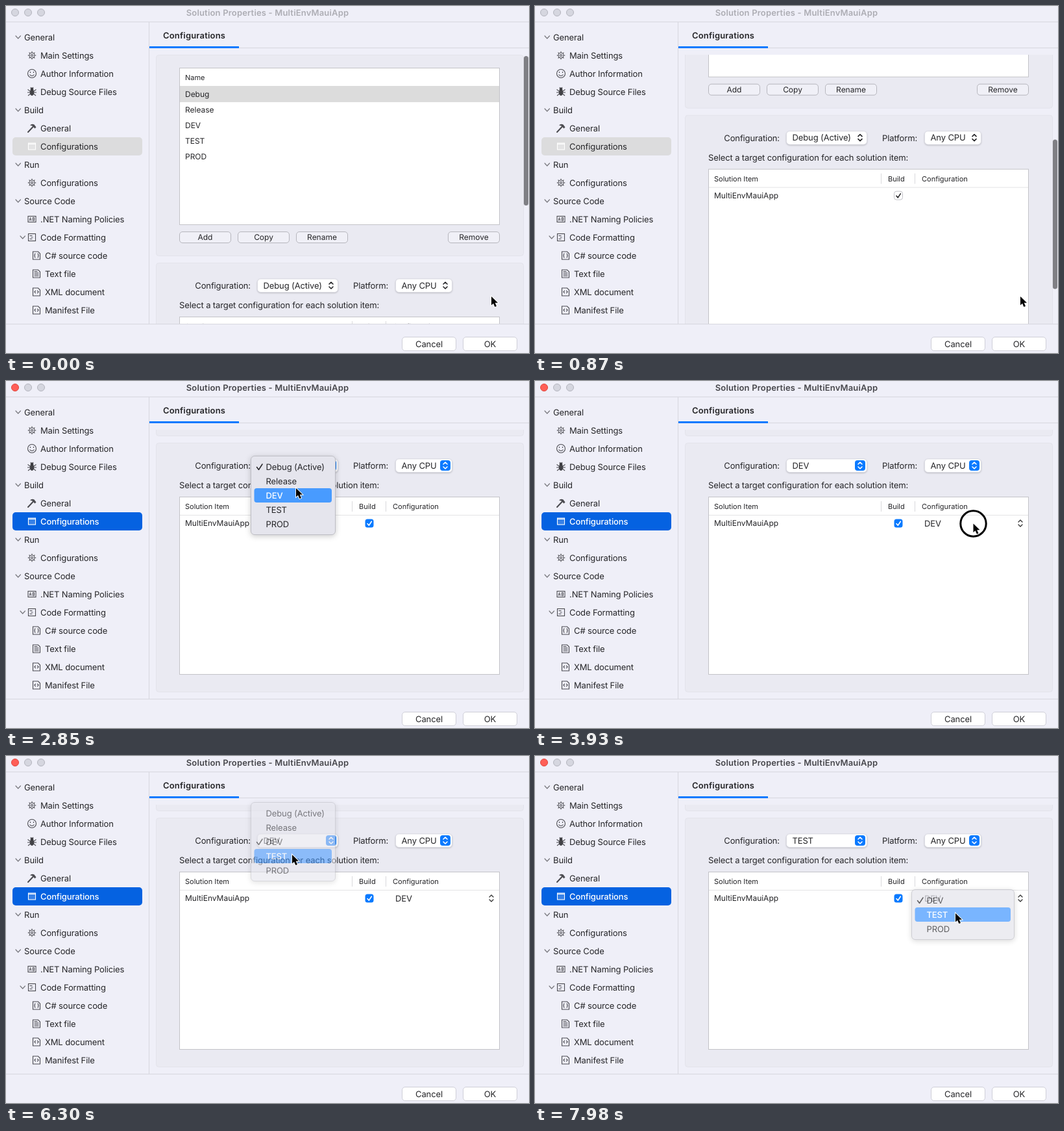
These frames come from a looping animation (806x534 px, 8 s). An HTML page:

```html
<!DOCTYPE html>
<html lang="en">
<head>
<meta charset="utf-8">
<title>Solution Properties</title>
<style>
html, body { margin: 0; width: 100%; height: 100%; overflow: hidden; background: #efeff8; }
svg { display: block; }
text { font: 13px Inter, sans-serif; letter-spacing: -.12px; fill: #252528; white-space: pre; text-rendering: geometricPrecision; }
.row { font-size: 12px; letter-spacing: -.02px; }
.head { font-size: 11px; letter-spacing: 0; }
.bold { font-weight: 600; letter-spacing: .18px; }
.strong { font-weight: 500; letter-spacing: -.12px; }
.mid { text-anchor: middle; }
.end { text-anchor: end; }
.white { fill: #fff; }
.icon { fill: none; stroke: #4b4b50; stroke-width: 1.1; }
.line { fill: none; stroke-linecap: round; stroke-linejoin: round; }
.box { fill: #eaeaf2; stroke: #e3e3eb; }
.table { fill: #fff; stroke: #c3c3c8; }
.popup { fill: #fff; stroke: #d6d6de; stroke-width: .7; filter: drop-shadow(0 1px .8px #0003); }
.menu { filter: drop-shadow(0 2px 4px #0003); }
.light { fill: #d5d6df; stroke: #b4b5be; }
.title { fill: #47474c; }
.accent { fill: #0a7aff; }
.selected { fill: #0562e1; }
.selected + g text { fill: #fff; font-weight: 500; }
.selected + g .icon { stroke: #fff; }
.arrows, .check { stroke: #fff; stroke-width: 1.6; }
.close { fill: #ff5f57; stroke: #e0463e; }
.idle .title { fill: #adadb4; }
.idle .close { fill: #d5d6df; stroke: #b4b5be; }
.idle .selected { fill: #dcdcdd; }
.idle .selected + g text { fill: #252528; font-weight: 400; }
.idle .accent { fill: none; }
.idle .arrows, .idle .check { stroke: #252528; }
.idle .tick { fill: #fff; stroke: #c2c2c8; }
</style>
</head>
<body>
<svg id="stage" width="806" height="534" viewBox="0 0 806 534"></svg>
<script>
const stage = document.getElementById('stage');
const LOOP = 8000;

// Drawing helpers; text is placed by its vertical centre.
const text = (x, y, s, cls = '', id = '') =>
  `<text x="${x}" y="${y}" dy=".36em" class="${cls}" id="${id}">${s}</text>`;
const rect = (x, y, w, h, cls, r = 0, more = '') =>
  `<rect x="${x}" y="${y}" width="${w}" height="${h}" rx="${r}" class="${cls}" ${more}/>`;
const path = (d, cls, more = '') => `<path d="${d}" class="${cls}" ${more}/>`;
const rule = (d, color) => path(d, '', `stroke="${color}" fill="none"`);
const arrows = (x, y, more = '') =>
  path(`M${x - 3} ${y - 2}l3-3 3 3M${x - 3} ${y + 2}l3 3 3-3`, 'line arrows', more);
const button = (x, y, w, h, label, cls, fill, stroke) =>
  rect(x + .5, y + .5, w - 1, h - 1, '', 4.5, `fill="${fill}" stroke="${stroke}"`) +
  text(x + w / 2, y + h / 2, label, 'mid ' + cls);
const popup = (x, w, label, id) =>
  rect(x, 420, w, 20.5, 'popup', 5) + text(x + 9, 430, label, '', id) +
  rect(x + w - 18.5, 422, 16, 16, 'accent', 4) + arrows(x + w - 10.5, 430);

const page = 'M-5.5-6h8l3 3v9h-11z';
const spokes = n => [...Array(n)].map((_, i) => {
  const a = i * 2 * Math.PI / n, c = Math.cos(a), s = Math.sin(a);
  return `M${4 * c} ${4 * s}L${6.3 * c} ${6.3 * s}`;
}).join('');
const icons = {
  gear: path('M-4 0a4 4 0 1 0 8 0a4 4 0 1 0-8 0M-1.5 0a1.5 1.5 0 1 0 3 0a1.5 1.5 0 1 0-3 0' + spokes(8), 'icon'),
  face: path('M-6.5 0a6.5 6.5 0 1 0 13 0a6.5 6.5 0 1 0-13 0M-3.5 1.5q3.5 4 7 0M-2.5-3v2M2.5-3v2', 'icon'),
  bug: '<ellipse cy="1" rx="3.3" ry="5" fill="#3c3c40"/><circle cy="-4" r="2.4" fill="#3c3c40"/>' +
    path('M-6.5-3.5L-3-1 3-1 6.5-3.5M-7 1H7M-6 6L-3 3.500H3L6 6M-2-7l1 2M2-7l-1 2', 'icon'),
  hammer: path('M-6 6L1.500-2', 'line', 'stroke="#4b4b50" stroke-width="2"') +
    path('M-3-4.500Q0-7.500 3.500-5.500L6.500-1.500 4.500 .500 2-2 .500-3.500z', '', 'fill="#4b4b50"'),
  window: rect(-5.5, -5, 11, 10, 'icon', 0, 'style="fill:#fff3"') + path('M-5.5-3.500h11', 'icon', 'stroke-width="2"'),
  naming: rect(-6, -4.5, 12, 9, 'icon') + path('M-4 2.500l1.500-5 1.500 5M-3.500 1h2M1.200-2.500v5h2.300v-5zM1.200 0h2.300', 'icon', 'style="stroke-width:.9"'),
  format: rect(-5.5, -5.5, 11, 11, 'icon') + path('M-3.500-2.500h4M-1.500 0h3M-3.500 2.500h4', 'icon'),
  braces: path(page + 'M-1.500-3q-1.500 0-1.200 1.500t-1 1.500q1.300 0 1 1.500t1.200 1.500M1.500-3q1.500 0 1.200 1.500t1 1.500q-1.300 0-1 1.500t-1.200 1.500', 'icon'),
  lines: path(page + 'M-3.500-3.500h5M-3.500-1.300h7M-3.500 1h7M-3.500 3.300h7', 'icon'),
  tags: path(page + 'M-1.200-2l-2 2 2 2M1.200-2l2 2-2 2', 'icon'),
};

// Sidebar rows: label, icon, indent level.
const sidebar = [
  ['General'], ['Main Settings', 'gear'], ['Author Information', 'face'], ['Debug Source Files', 'bug'],
  ['Build'], ['General', 'hammer'], ['Configurations', 'window'],
  ['Run'], ['Configurations', 'gear'],
  ['Source Code'], ['.NET Naming Policies', 'naming'], ['Code Formatting', 'format'],
  ['C# source code', 'braces', 7], ['Text file', 'lines', 7], ['XML document', 'tags', 7], ['Manifest File', 'tags', 7],
].map(([label, icon, indent = 0], i) => {
  const y = 48 + 28 * i, folder = !icon || icon === 'format';
  return (i === 6 ? rect(10, 202, 200, 28, 'selected', 5) : '') + '<g>' +
    (folder ? path(`M${icon ? 22 : 15} ${y - 2}l3.700 4 3.700-4`, 'line', 'stroke="#77777d" stroke-width="1.200"') : '') +
    (icon ? `<g transform="translate(${40 + indent} ${y})">${icons[icon]}</g>` : '') +
    text(icon ? 53 + indent : 28, y, label) + '</g>';
}).join('');

const content =
  rect(231.5, 75.5, 566, 309, 'box', 4) + rect(267.5, 95.5, 493, 241, 'table') +
  text(276, 110.5, 'Name', 'head') + rect(268, 123, 492, 25, '', 0, 'fill="#dcdcdc"') +
  ['Debug', 'Release', 'DEV', 'TEST', 'PROD'].map((s, i) => text(276, 135.500 + 24 * i, s, 'row')).join('') +
  [['Add', 267], ['Copy', 357], ['Rename', 447], ['Remove', 681]]
    .map(([s, x]) => button(x, 347, 80, 18, s, 'row', '#f0f0f7', '#b6b6bd')).join('') +
  rect(231.5, 395.5, 566, 383, 'box', 4) +
  text(377, 430.500, 'Configuration:', 'end') + popup(387.5, 124, '', 'config') +
  text(535, 430.500, 'Platform:') + popup(600.5, 87, 'Any CPU') +
  text(267, 460.500, 'Select a target configuration for each solution item:') +
  rect(267.5, 478.5, 493, 273, 'table') + rule('M268 506.500H760', '#e3e3e5') +
  rule('M533.500 485V501M585.500 485V501', '#d9d9dc') +
  text(276, 493.500, 'Solution Item', 'head') + text(544, 493.500, 'Build', 'head') + text(596, 493.500, 'Configuration', 'head') +
  text(276, 519, 'MultiEnvMauiApp', 'row') +
  rect(553.5, 512.5, 13, 13, 'accent tick', 3.5) + path('M557 519.500l2.300 2.700 4-6', 'line check') +
  `<g id="cell">${text(600, 519.500, '', '', 'target')}${arrows(748, 519, 'style="stroke:#333;stroke-width:1.3"')}</g>`;

stage.innerHTML =
  '<clipPath id="view"><path d="M221 75H806V489H221z"/></clipPath>' +
  rect(0, 0, 806, 534, '', 0, 'fill="#efeff8"') +
  [14, 34, 54].map((x, i) => `<circle cx="${x}" cy="10" r="5.500" class="${i ? 'light' : 'close'}"/>`).join('') +
  text(403, 10, 'Solution Properties - MultiEnvMauiApp', 'bold title mid') +
  rule('M0 24.500H806M220.500 25V489M359 64.500H806', '#d7d7df') +
  text(242, 45, 'Configurations', 'bold') + rect(221, 62, 138, 3, '', 0, 'fill="#0a7aff"') + sidebar +
  `<g clip-path="url(#view)"><g id="content">${content}</g></g>` +
  rect(798, 77, 7, 230, '', 3.5, 'id="thumb" fill="#7f7f84"') +
  rule('M0 489.500H806', '#d7d7df') +
  button(610, 509, 84, 22, 'Cancel', '', '#fff', '#cfcfd8') + button(704, 509, 84, 22, 'OK', '', '#fff', '#cfcfd8') +
  '<g id="menu" class="menu"></g><g id="pointer"><circle id="ring" r="19.700" fill="none" stroke="#000" stroke-width="3"/>' +
  path('M0 0V13.500L3 10.800 5.400 16 8 14.900 5.700 9.800H10z', '', 'stroke="#fff" stroke-width="1.800" paint-order="stroke"') + '</g>';

const el = id => document.getElementById(id);
const clamp = v => Math.max(0, Math.min(1, v));

// Pointer stops: time, x, y.
const stops = [
  [0, 748, 447], [1620, 748, 447], [2220, 450, 132], [2370, 450, 132], [2460, 447, 129], [2730, 447, 129],
  [2850, 447, 165], [3060, 447, 174], [3480, 447, 174], [3630, 660, 214], [3810, 660, 214], [3900, 675.5, 219.500],
  [4350, 675.5, 219.5], [4410, 673, 220], [4740, 673, 220], [5160, 441, 131], [5520, 441, 131], [5850, 441, 152],
  [6390, 441, 152], [6840, 672, 218], [7290, 672, 218], [7530, 648, 242], [LOOP, 648, 242],
];
const clicks = [2640, 3330, 3900, 4590, 5190, 6120, 6900, 7710];
const CLICK_LENGTH = 90, FADE = 170;

const configs = ['Debug (Active)', 'Release', 'DEV', 'TEST', 'PROD'], targets = configs.slice(2);
const configMenu = { x: 377, w: 131, items: configs }, cellMenu = { x: 580, w: 159, items: targets };
const menus = [
  { ...configMenu, y: 115, open: 2700, close: 3430, checked: 0 },
  { ...cellMenu, y: 205, open: 3990, close: 4650, checked: 0 },
  { ...configMenu, y: 71, open: 5280, close: 6230, checked: 2 },
  { ...cellMenu, y: 205, open: 7020, close: 7935, checked: 0 },
];

function pointerAt(t) {
  const i = stops.findIndex(s => s[0] > t);
  const [t0, x0, y0] = stops[i - 1], [t1, x1, y1] = stops[i];
  const p = (t - t0) / (t1 - t0), e = p * p * (3 - 2 * p);
  return [x0 + (x1 - x0) * e, y0 + (y1 - y0) * e];
}

function menuMarkup({ x, y, w, items, checked }, pointerY) {
  const hover = Math.floor((pointerY - y - 6) / 22);
  return rect(x + .5, y + .5, w - 1, items.length * 22 + 11, '', 5.5, 'fill="#e5e5ed" stroke="#bdbdc4"') +
    items.map((label, i) => {
      const mid = y + 17 + 22 * i, on = i === hover;
      return (on ? rect(x + 5.5, mid - 11, w - 11.5, 22, '', 4, 'fill="#489bff"') : '') +
        (i === checked ? path(`M${x + 9.500} ${mid + .5}l3 4 5.500-8.500`, 'line', `stroke="${on ? '#fff' : '#252528'}" stroke-width="1.500"`) : '') +
        text(x + 23.500, mid + .5, label, on ? 'white strong' : '');
    }).join('');
}

function draw(now) {
  const t = now % LOOP, [x, y] = pointerAt(t);
  const scroll = 300 * (1 - (1 - clamp((t - 645) / 600)) ** 3);
  stage.classList.toggle('idle', t < 2670);
  el('content').setAttribute('transform', `translate(0 ${-scroll})`);
  el('thumb').setAttribute('y', 77 + scroll * .565);
  el('thumb').setAttribute('opacity', 1 - clamp((t - 1650) / 250));
  el('config').textContent = t < 3570 ? 'Debug (Active)' : t < 6400 ? 'DEV' : 'TEST';
  el('target').textContent = 'DEV';
  el('cell').setAttribute('visibility', t < 3600 ? 'hidden' : 'visible');

  const menu = menus.find(m => t >= m.open && t < m.close + FADE);
  el('menu').innerHTML = menu ? menuMarkup(menu, y) : '';
  if (menu) el('menu').setAttribute('opacity', 1 - clamp((t - menu.close) / FADE));

  el('pointer').setAttribute('transform', `translate(${x} ${y})`);
  const pressed = clicks.some(c => t >= c && t < c + CLICK_LENGTH);
  el('ring').setAttribute('visibility', pressed ? 'visible' : 'hidden');
}

const start = performance.now();
function tick() {
  draw(performance.now() - start);
  requestAnimationFrame(tick);
}
tick();
</script>
</body>
</html>
```
